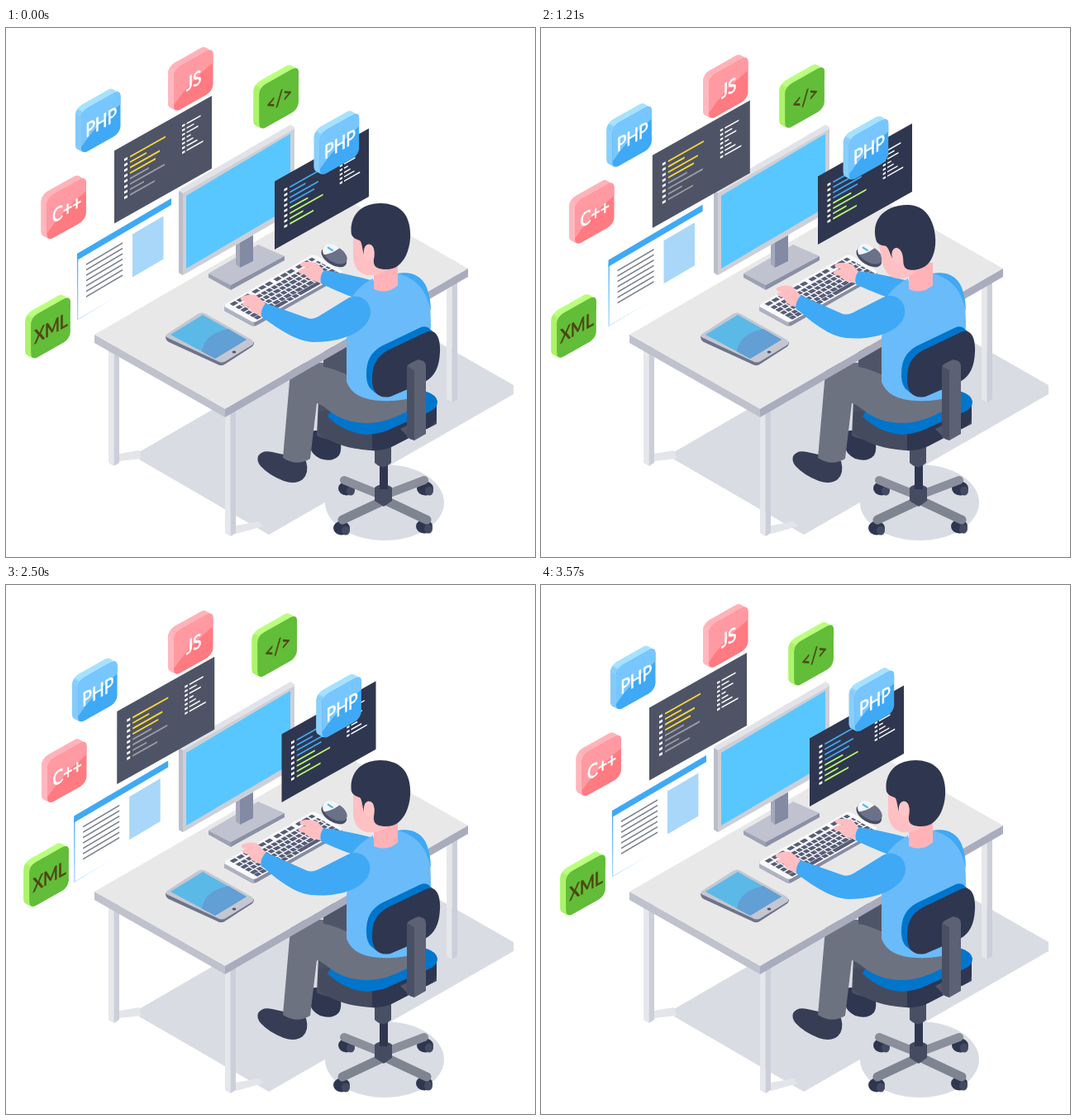
Animation of 640 by 640 pixels, one loop 3640 ms. Source, as an HTML page:

```html
<!DOCTYPE html>
<html lang="en">
<head>
<meta charset="utf-8">
<title>Developer at a desk</title>
<style>
  html, body { margin: 0; width: 100%; height: 100%; overflow: hidden; background: #fff; }
  svg { display: block; width: 100vw; height: 100vh; }
  text { font: 23px Lato, sans-serif; text-anchor: middle; stroke-width: .7; }
</style>
</head>
<body>
<svg id="stage" viewBox="0 0 640 640"></svg>
<script>
const LOOP = 3640, STEPS = 51, CYCLE = 50;
const stage = document.getElementById('stage');

const poly = (points, fill) => `<polygon points="${points}" fill="${fill}"/>`;
const path = (d, fill, extra = '') => `<path d="${d}" fill="${fill}" ${extra}/>`;
const line = (d, color, width, extra = '') =>
  `<path d="${d}" fill="none" stroke="${color}" stroke-width="${width}" ${extra}/>`;
const group = (id, body) => `<g id="${id}">${body}</g>`;
const ISO = -0.5625;

const SKINS = {
  blue:  { top: '#a6e2ff', side: '#82cafa', light: '#78c6ff', base: '#3fa9f5', ink: '#fff' },
  pink:  { top: '#ffb3b9', side: '#ffb8be', light: '#ff9aa2', base: '#ff7a81', ink: '#fff' },
  green: { top: '#b9ff7d', side: '#a8f065', light: '#62bd38', base: '#62bd38', ink: '#4f4612' }
};

// Isometric rounded tile, 55 by 80, with its top left at the group origin.
function tile(id, skin, label) {
  const c = SKINS[skin];
  const face = (x, body) => `<g transform="matrix(1 ${ISO} 0 1 ${x} ${24.5 + x * 4 / 7})">${body}</g>`;
  let back = '';
  for (let x = 0; x < 7; x++) {
    back += face(x, `<rect width="47.5" height="52.5" rx="8" fill="${c.top}"/>`
      + path('M3 2.5 Q0 4 0 8 V44.5 Q0 52.5 8 52.5 V10Z', c.side));
  }
  return group(id, back
    + face(7, `<rect width="47.5" height="52.5" rx="8" fill="${c.base}"/>`
      + path('M0 43 V8 Q0 0 8 0 H39.5 Q47.5 0 47.5 8 V18 Q18 26 0 43Z', c.light))
    + `<text transform="matrix(.84 -.4725 0 1 31.2 49.5)" fill="${c.ink}" stroke="${c.ink}">${label}</text>`);
}

const ROWS = [43, 20, 36, 31, 23, 42, 17, 30];
const SIDE_ROWS = [17, 9, 14, 5, 8, 13, 20];

function codePanel(id, x, y, w, h, scale, fill, first, second) {
  let body = '';
  ROWS.forEach((len, i) => {
    const ly = 18 + i * 6.6;
    body += line(`M12 ${ly}h4`, '#fff', 3);
    body += line(`M19 ${ly}h${len}`, i < 4 ? first : second, 2.1);
  });
  SIDE_ROWS.forEach((len, i) => {
    const ly = 16.5 + i * 5.4;
    body += line(`M82 ${ly}h3.5`, '#fff', 2.4) + line(`M87.5 ${ly}h${len}`, '#fff', 1.7);
  });
  return group(id, `<g transform="matrix(1 ${ISO} 0 1 ${x} ${y})">
    <rect width="${w}" height="${h}" fill="${fill}"/><g transform="scale(${scale})">${body}</g></g>`);
}

function webPage() {
  let lines = '';
  for (let i = 0; i < 7; i++) lines += line(`M11 ${19.5 + i * 6.5}H55`, '#777d8c', 1.7);
  return group('page', `<g transform="matrix(1 -.588 0 1 86 273)">
    <rect width="114" height="80" fill="#fff"/>
    ${line('M.6 4V80', 'url(#fadeDown)', 1.3)}
    ${line('M0 80H48', 'url(#fadeRight)', .9)}
    <rect width="114" height="8" fill="#3fa9f5"/>
    <rect x="67" y="16" width="37.5" height="52" fill="#a9d7f9"/>${lines}</g>`);
}

function monitor() {
  return poly('245,297 305,262 337,276 272,311', '#c0c3cf')
    + poly('245,297 272,311 272,317 245,302', '#9da1b3')
    + poly('272,311 337,276 337,281 272,317', '#8b90a6')
    + poly('278,262 283,258 283,290 278,286', '#a4a8ba')
    + poly('283,259 299,250 299,282 283,290', '#828aa4')
    + path('M209 199 Q209 196 212 194 L344 117 L349 120 V222 L214 299 L209 296Z', '#e2e3e8')
    + poly('209,197 214,200 214,299 209,296', '#bcbec9')
    + poly('214,200 349,122 349,221 214,299', '#cdcfd7')
    + poly('218,203 344,128 344,217 218,291', '#59c7ff');
}

function keyboard() {
  const row = (y, dash) => line(`M5 ${y}H118`, '#575d78', 4.9, `stroke-dasharray="${dash}"`);
  return path('M264 335 L300 356 L407 296 V301 L303 360 Q300 361 297 360 L264 342Z', '#878ca2')
    + poly('264,335 300,356 300,361 264,342', '#aeb2c3')
    + path('M264 337 Q264 335 267 333 L369 275 Q372 274 375 275 L405 293 Q408 296 405 298 L303 355 Q300 356 297 355 L266 338Z', '#fafafc')
    + `<g transform="matrix(.88 -.497 .88 .5 264 335)">
      ${row(5, '7 2 7 2 7 5')}${row(13, '5.4 1.5')}${row(19.5, '7 1.5 5.4 1.5 5.4 1.5')}
      ${row(26, '5.4 1.5')}${row(32.5, '7 1.5 5.4 1.5')}${row(38, '6 1.5 6 1.5 28 1.5')}</g>`;
}

function mouse() {
  return `<g transform="rotate(32 397 275)">
    <ellipse cx="398" cy="277" rx="17" ry="9.5" fill="#474d63"/>
    <ellipse cx="397" cy="273.5" rx="16.5" ry="9.5" fill="#6b7189"/>
    ${path('M398 264 Q382 263 380.5 273 Q381 278 386 281 Q393 276 398 264Z', '#f4f5f8')}
    ${line('M386 271h6', '#59b9ee', 2.2, 'stroke-linecap="round"')}</g>`;
}

function tablet() {
  return path('M193 373 Q193 378 197 380 L256 407 Q261 410 266 406 L297 386 Q300 384 300 380Z', '#6f748a')
    + path('M195 370 L232 346 Q237 343 242 346 L297 377 Q302 381 297 384 L266 403 Q261 406 256 403 L196 375 Q191 373 195 370Z', '#c4c7d1')
    + poly('199,371 238,347 291,377 253,400', '#5bb9e8')
    + path('M291 377 L253 400 L237 391.5 Q240 370 269 364Z', '#619fd4')
    + '<ellipse cx="276" cy="392" rx="2.4" ry="1.6" fill="#50566a"/>';
}

// Square table leg with a pale left face and a darker right face.
function tableLeg(x, top, bottom) {
  return poly(`${x},${top} ${x + 6.5},${top} ${x + 6.5},${bottom} ${x},${bottom - 4}`, '#e6e7eb')
    + poly(`${x + 6.5},${top} ${x + 13},${top} ${x + 13},${bottom - 4} ${x + 6.5},${bottom}`, '#cccfda');
}

function floor() {
  return poly('161,513 456,342 614,432 614,443 318,613 161,522', '#dadce4')
    + '<ellipse cx="458" cy="574" rx="72" ry="46" fill="#dadce4"/>'
    + poly('137,515 161,511 164,521 137,524', '#e3e5ea')
    + poly('278,602 306,597 311,603 278,612', '#e3e5ea');
}

function chairBase() {
  const feet = [[412, 557], [507, 557], [406, 605], [506, 603]];
  const caster = ([x, y]) => `<ellipse cx="${x}" cy="${y}" rx="10" ry="8.5" fill="#2f3650"/>
    <ellipse cx="${x + 5}" cy="${y + 3}" rx="5" ry="5.5" fill="#434a61"/>`;
  return feet.map(caster).join('')
    + line('M456 566L409 547M456 566L506 547', '#8a8f9b', 10, 'stroke-linecap="round"')
    + line('M456 572L407 595M460 572L509 595', '#7e8490', 11, 'stroke-linecap="round"')
    + path('M446 556 Q456 548 467 556 L467 572 L457 579 L446 572Z', '#454b60')
    + '<rect x="452" y="525" width="10" height="33" fill="#2f3650"/>'
    + path('M446 495H466V526Q456 536 446 526Z', '#4a5063');
}

function legs() {
  return path('M384 385 H415 V430 L384 415Z', '#4f5568')
    + path('M368 490 Q372 485 380 488 L402 494 Q408 508 403 517 Q395 526 380 521 Q368 515 368 505Z', '#2f3650')
    + path('M378 450 L376 493 Q388 500 400 496 L402 460Z', '#4b5164')
    + path('M378 464 V490 Q400 508 440 511 Q458 512 470 505 L521 479 V455Z', '#454b5e')
    + path('M443 491 L521 455 V470 Q521 478 514 482 L470 505 Q458 512 443 511Z', '#2f3650')
    + path('M389 470 Q410 490 437 492 Q455 491 470 483 L513 464 Q522 460 522 452 Q521 444 509 440 L480 440 L400 452Z', '#0075cc')
    + path('M305 518 Q310 510 322 513 L340 517 L363 524 Q367 538 359 546 Q350 553 336 548 Q318 541 308 530 Q303 524 305 518Z', '#363d55')
    + path('M345 405 H384 V410 Q395 411 425 425 L480 440 L492 460 Q462 478 437 478 Q410 478 391 463 Q381 455 376 454 L368 521 Q352 531 335 520Z', '#6d7280');
}

function desk() {
  return poly('107,371 401,201 559,291 265,461', '#e8e8e9')
    + poly('107,371 265,461 265,471 107,381', '#bfc1cd')
    + poly('265,461 559,291 559,301 265,471', '#a9acbd');
}

function head() {
  return path('M445 284H474V311Q462 323 445 316Z', '#ffb3b7')
    + group('head',
      path('M420 242 V278 Q422 296 437 299 Q448 301 462 292 L460 240Z', '#ffc0c3')
      + path('M418 250 C416 238 420 227 428 220 C441 209 468 209 480 222 C492 235 491 260 484 275 C478 287 470 293 457 292 C448 291 444 288 445 280 C447 270 445 262 439 262 C434 262 434 268 433 274 C431 268 431 260 428 257 C424 256 420 254 418 250Z', '#2f364f')
      + '<ellipse cx="439" cy="271" rx="6.3" ry="9.5" fill="#ffc6c9"/>');
}

function rightArm() {
  return group('armRight',
    path('M385 294 L377 285 Q366 281 357 284 Q354 287 359 289 L366 290 Q358 290 354 294 Q354 298 361 298 L366 303 Q373 307 382 308Z', '#ffbfc2')
    + path('M385 293 Q412 297 445 306 L442 333 Q411 324 381 309 Q379 299 385 293Z', '#3fa9f5'));
}

function torso() {
  return path('M444 303 L445 312 Q458 323 474 311 V297 Q500 293 509 317 Q514 332 514 362 L500 445 Q480 452 455 451 Q420 450 412 428 V375 L420 323 Q430 310 444 303Z', '#6abbf9')
    + path('M474 297 Q500 293 509 314 Q514 327 514 343 Q507 305 474 297Z', '#3fa9f5');
}

function leftArm() {
  return group('armLeft',
    path('M314 333 L302 323 Q292 321 284 326 Q282 330 290 331 L285 333 Q286 337 293 337 Q297 345 306 347 L311 348Z', '#ffbfc2')
    + path('M314 333 L365 351 Q371 353 378 349 L412 328 C424 320 441 327 441 344 C441 362 415 380 372 380 C352 379 332 366 309 349 Q308 340 314 333Z', '#3fa9f5'));
}

function chairBack() {
  const pad = 'M443 425 C443 408 448 398 462 390 L508 368 C520 363 526 375 525 392 C524 415 516 425 500 431 L465 446 C450 449 443 440 443 425Z';
  return path(pad, '#0075cc', 'transform="translate(-7 -5.5)"')
    + path(pad, '#0075cc', 'transform="translate(-3.5 -2.5)"')
    + path(pad, '#2f364f')
    + poly('477,485 487,480 497,492 490,498', '#50566a')
    + path('M485 410 Q486 406 499 401 L505 403 Q508 405 508 410 V491 L494 499 L485 495Z', '#5c6274')
    + poly('485,409 494,414 494,499 485,495', '#4a5064');
}

stage.innerHTML = `<defs>
  <linearGradient id="fadeDown" gradientUnits="userSpaceOnUse" x1="0" y1="0" x2="0" y2="80">
    <stop stop-color="#3fa9f5"/><stop offset="1" stop-color="#a9d7f9"/></linearGradient>
  <linearGradient id="fadeRight" gradientUnits="userSpaceOnUse" x1="0" y1="0" x2="48" y2="0">
    <stop stop-color="#b5dcf8"/><stop offset="1" stop-color="#fff"/></linearGradient></defs>`
  + floor() + tableLeg(124, 384, 530) + tableLeg(533, 300, 453)
  + chairBase() + legs() + tableLeg(265, 464, 615) + desk()
  + monitor() + keyboard() + mouse() + tablet()
  + codePanel('panelLeft', 131, 148.4, 118, 88, 1, '#4e5466', '#fdd835', '#9a9ca3')
  + webPage()
  + codePanel('panelRight', 325, 185.5, 114, 82.5, .96, '#2f364f', '#3fa9f5', '#b9f871')
  + tile('php', 'blue', 'PHP') + tile('js', 'pink', 'JS') + tile('cpp', 'pink', 'C++')
  + tile('xml', 'green', 'XML') + tile('tag', 'green', '&lt;/&gt;') + tile('phpFront', 'blue', 'PHP')
  + rightArm() + torso() + head() + leftArm() + chairBack();

// Each axis is [middle, swing, step of the peak].
const FLOATS = {
  js: [[196, 0, 0], [28, -6, 0]],
  php: [[81, 3, 0], [84, -11.5, 0]],
  cpp: [[39.5, 5.5, 42], [182, -5, 3]],
  xml: [[18.6, 6.5, 44], [318, 7, 8]],
  tag: [[294.7, 6.5, 44], [40, 7, 8]],
  phpFront: [[371, 5.4, 40], [104, -5, 2]],
  panelLeft: [[2.5, -2.5, 0], [3.6, -3.6, 0]],
  page: [[-2.9, 2.9, 0], [5, -5, 0]],
  panelRight: [[6.5, -6.5, 0], [-3.9, 3.9, 0]]
};

// Pivot of each joint, then [step, degrees] keys.
const JOINTS = {
  head: ['458 316', [[0, 0], [11, -11], [18, -11], [29, 0], [37, 0], [44, -9.5], [45, -9.5], [50, 0]]],
  armLeft: ['432 335', [[0, 0], [6, 4.6], [38, 4.6], [44, 0], [50, 0]]],
  armRight: ['440 318', [[0, 0], [7, -4], [17, -1], [28, -13], [35, -1], [45, -4], [50, 0]]]
};

const wave = ([mid, swing, peak], n) => mid + swing * Math.cos(2 * Math.PI * (n - peak) / CYCLE);

function ease(keys, n) {
  const i = Math.max(1, keys.findIndex(key => key[0] >= n));
  const [n0, a] = keys[i - 1], [n1, b] = keys[i];
  const p = (n - n0) / (n1 - n0);
  return a + (b - a) * p * p * (3 - 2 * p);
}

const move = (id, value) => document.getElementById(id).setAttribute('transform', value);

function draw(ms) {
  const n = Math.floor((ms % LOOP + 5) * STEPS / LOOP) % STEPS;
  for (const [id, [x, y]] of Object.entries(FLOATS)) {
    move(id, `translate(${wave(x, n).toFixed(2)} ${wave(y, n).toFixed(2)})`);
  }
  for (const [id, [pivot, keys]] of Object.entries(JOINTS)) {
    move(id, `rotate(${ease(keys, n).toFixed(2)} ${pivot})`);
  }
}

const start = performance.now();
function tick() {
  draw(performance.now() - start);
  requestAnimationFrame(tick);
}
tick();
</script>
</body>
</html>
```
